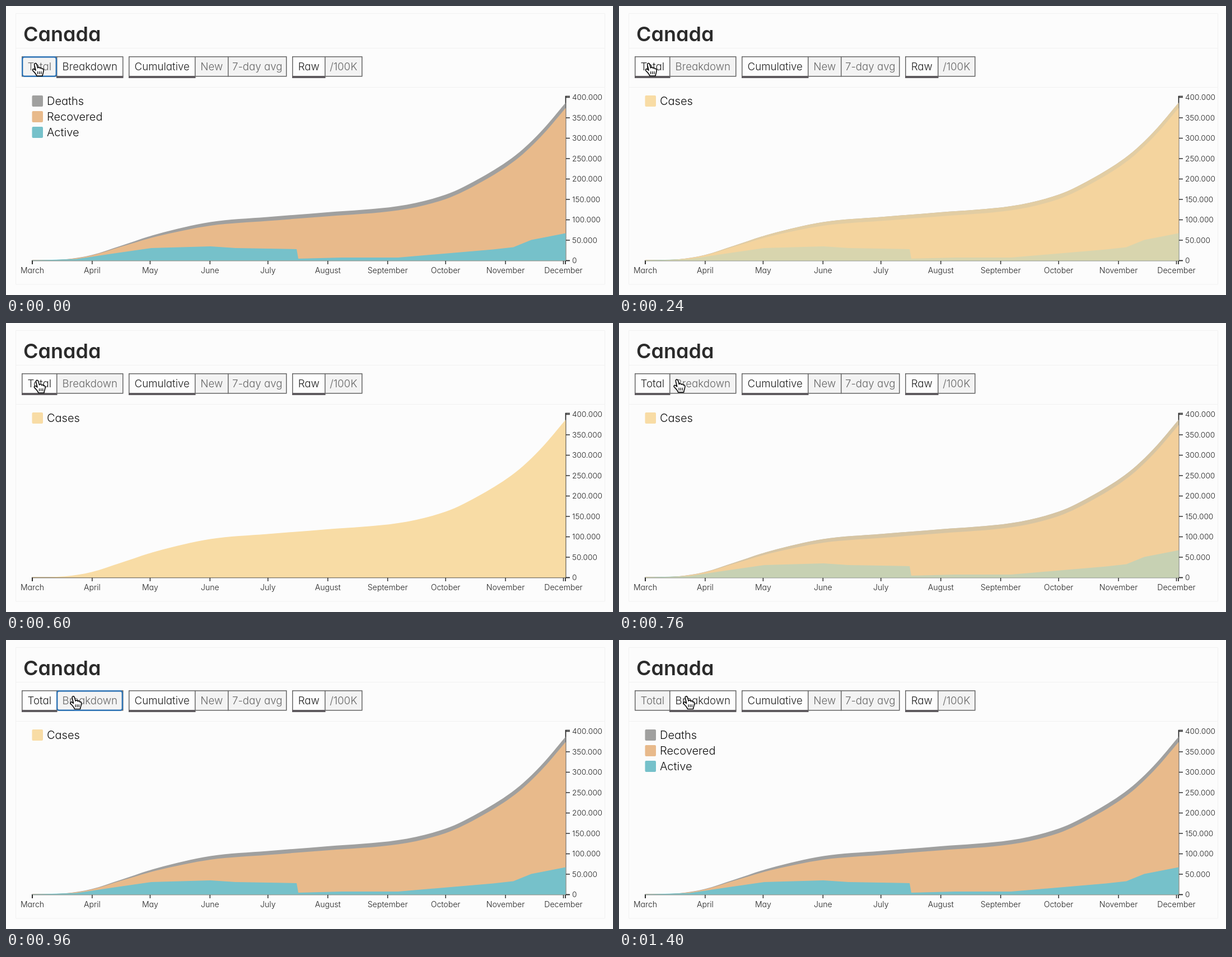
These frames come from a looping animation (1084 px wide and 517 px high, 1800 ms). An HTML page:

```html
<!DOCTYPE html>
<html lang="en">
<head>
<meta charset="utf-8">
<title>Case chart</title>
<style>
  html, body { margin: 0; width: 100%; height: 100%; overflow: hidden; background: #fcfcfc; }
  svg { display: block; width: 100%; height: 100%; }
  text { font-family: Inter, Lato, sans-serif; font-feature-settings: "cv11"; font-weight: 300; }
  .title { font-size: 36px; font-weight: 600; fill: #2b2b2b; }
  .button { font-size: 18.7px; text-anchor: middle; }
  .legend { font-size: 20px; fill: #111; }
  .tick { font-size: 14.1px; fill: #222; }
  .value { font-size: 13.7px; }
</style>
</head>
<body>
<svg id="stage" viewBox="0 0 1084 517"></svg>
<script>
const LOOP = 1800, STEP = 40;
const LEFT = 47, RIGHT = 999.5, BASE = 455.5;
const COLORS = { cases: '#f8dca5', deaths: '#a0a09f', recovered: '#e8ba8b', active: '#76c1ca' };
const stage = document.getElementById('stage');

function add(parent, tag, attrs = {}, text = '') {
  const node = document.createElementNS('http://www.w3.org/2000/svg', tag);
  for (const key in attrs) node.setAttribute(key, attrs[key]);
  if (text) node.textContent = text;
  parent.appendChild(node);
  return node;
}
const show = (node, on) => node.setAttribute('visibility', on ? 'visible' : 'hidden');

// Card
add(stage, 'path', {
  d: 'M17.5 13.5H1069.5V498H17.5ZM17.5 75.5H1069.5M17.5 145.5H1069.5',
  fill: '#fcfcfc', stroke: '#f1f1f1'
});
add(stage, 'text', { x: 31, y: 62.5, class: 'title' }, 'Canada');

// Buttons
function button(label, x, width, on) {
  const box = add(stage, 'rect', { x, y: 90.75, width, height: 35, stroke: '#666', 'stroke-width': 1.5 });
  const bar = add(stage, 'rect', { x: x - .75, y: 125, width: width + 1.5, height: 4, fill: '#5f5b5f' });
  const text = add(stage, 'text', { x: x + width / 2, y: 115.3, class: 'button' }, label);
  const select = on => {
    box.setAttribute('fill', on ? '#fdfdfd' : '#f3f3f3');
    text.setAttribute('fill', on ? '#222' : '#666');
    show(bar, on);
  };
  select(on);
  return select;
}
const selectTotal = button('Total', 28.75, 62);
const selectBreakdown = button('Breakdown', 90.75, 118);
button('Cumulative', 219.75, 118, true);
button('New', 337.75, 59, false);
button('7-day avg', 396.75, 104, false);
button('Raw', 511.75, 58, true);
button('/100K', 569.75, 66, false);

const ring = (x, width) => add(stage, 'rect', {
  x, y: 91.2, width, height: 34.6, rx: 3.5, fill: 'none', stroke: '#2d73b5', 'stroke-width': 2.4
});
const totalRing = ring(29.2, 60.6);
const breakdownRing = ring(91.2, 116.6);

// Legends
function legend(...names) {
  const g = add(stage, 'g');
  names.forEach((name, i) => {
    add(g, 'rect', { x: 46.5, y: 160 + 28 * i, width: 19.5, height: 20, rx: 2, fill: COLORS[name.toLowerCase()] });
    add(g, 'text', { x: 73, y: 177 + 28 * i, class: 'legend' }, name);
  });
  return g;
}
const casesLegend = legend('Cases');
const breakdownLegend = legend('Deaths', 'Recovered', 'Active');

// Axes
const line = (d, width = 1.4) =>
  add(stage, 'path', { d, fill: 'none', stroke: '#222', 'stroke-width': width });
line(`M${LEFT} 462V${BASE}H999V462M1007 161.5H${RIGHT}V${BASE}H1007`, 1.7);

const DAY = 864e5, firstDay = Date.UTC(2020, 2, 1);
for (let month = 2; month < 12; month++) {
  const date = new Date(Date.UTC(2020, month, 1));
  const x = LEFT + (date - firstDay) / DAY * 3.449;
  line(`M${x} ${BASE}V462`);
  add(stage, 'text', { x, y: 478, class: 'tick', 'text-anchor': 'middle' },
    date.toLocaleString('en', { month: 'long', timeZone: 'UTC' }));
}
for (let i = 0; i <= 8; i++) {
  const y = BASE - i * 36.5;
  line(`M1000 ${y}H1007`);
  add(stage, 'text', { x: 1011, y: y + 4.8, class: 'tick value' }, i ? i * 50 + '.000' : '0');
}

// Areas
const total = [
  [LEFT, 454.6], [105, 453.2], [153, 445.5], [205, 429], [270, 408], [365, 386.5], [467, 377.5],
  [574, 369], [700, 358], [785, 337.5], [850, 306], [910, 267], [955, 225], [RIGHT, 173]
];
const active = [
  [LEFT, 455], [125, 452.7], [190, 443], [260, 433], [365, 430], [410, 433], [519, 435],
  [522, 452], [600, 450], [700, 450], [870, 435.5], [906, 431.5], [938, 418.5], [RIGHT, 406.5]
];
const deaths = x => 7 / (1 + Math.exp((255 - x) / 45)) + 2.5 * ((x - LEFT) / (RIGHT - LEFT)) ** 4;
const recovered = total.map(([x, y]) => [x, y + deaths(x)]);

// Cubic segments whose slope at each point follows its two neighbours.
function smooth(points) {
  const slope = i => {
    const a = points[Math.max(0, i - 1)], b = points[Math.min(points.length - 1, i + 1)];
    return (b[1] - a[1]) / (b[0] - a[0]);
  };
  return points.slice(1).reduce((d, [x1, y1], i) => {
    const [x0, y0] = points[i], h = (x1 - x0) / 3;
    return `${d}C${x0 + h} ${y0 + h * slope(i)} ${x1 - h} ${y1 - h * slope(i + 1)} ${x1} ${y1}`;
  }, 'M' + points[0]);
}
const area = (parent, outline, fill) =>
  add(parent, 'path', { d: `${outline}V${BASE}H${LEFT}Z`, fill });

const breakdownArea = add(stage, 'g');
area(breakdownArea, smooth(total), COLORS.deaths);
area(breakdownArea, smooth(recovered), COLORS.recovered);
area(breakdownArea, 'M' + active.join('L'), COLORS.active);
const casesArea = area(stage, smooth(total), COLORS.cases);

// Pointer
const pointer = add(stage, 'g');
add(pointer, 'path', {
  d: 'M-6.3 -8.5C-7 -12 -3 -12.8 -2 -9.3L-.3 -3.2C.5 -5 3.3 -4.8 3.8 -2.6C4.8 -4 7 -3.3 7.3 -1.5' +
     'C9 -2.3 10.3 -1 10.2 1C10 5 8.4 7 8 11.2H-2C-2.8 8 -6 5 -8.8 2C-10.6 -.2 -8.3 -2.4 -6.2 -.8L-4 1Z',
  fill: '#fff', stroke: '#111', 'stroke-width': 1.7, 'stroke-linejoin': 'round'
});
add(pointer, 'path', { d: 'M-.4 3V8M2.7 3V8M5.8 3V8', stroke: '#111', 'stroke-width': 1.3 });

const ease = (t, start, length) => {
  const p = Math.min(1, Math.max(0, (t - start) / length));
  return (1 - Math.cos(Math.PI * p)) / 2;
};

function draw(t) {
  const isTotal = t >= 80 && t < 1120;
  selectTotal(isTotal);
  selectBreakdown(!isTotal);
  show(totalRing, t < 80);
  show(breakdownRing, t >= 920 && t < 1120);

  const isCases = t >= 120 && t < 1160;
  show(casesLegend, isCases);
  show(breakdownLegend, !isCases);

  const cases = ease(t, 40, 300) - ease(t, 638, 290);
  casesArea.setAttribute('opacity', cases);
  show(breakdownArea, cases < .999);

  const move = ease(t, 560, 300);
  pointer.setAttribute('transform', `translate(${57 + 67.5 * move} ${114 - 1.7 * move})`);
}

const start = performance.now();
function frame() {
  const t = (performance.now() - start) % LOOP;
  draw(Math.floor(t / STEP) * STEP);
  requestAnimationFrame(frame);
}
frame();
</script>
</body>
</html>
```
